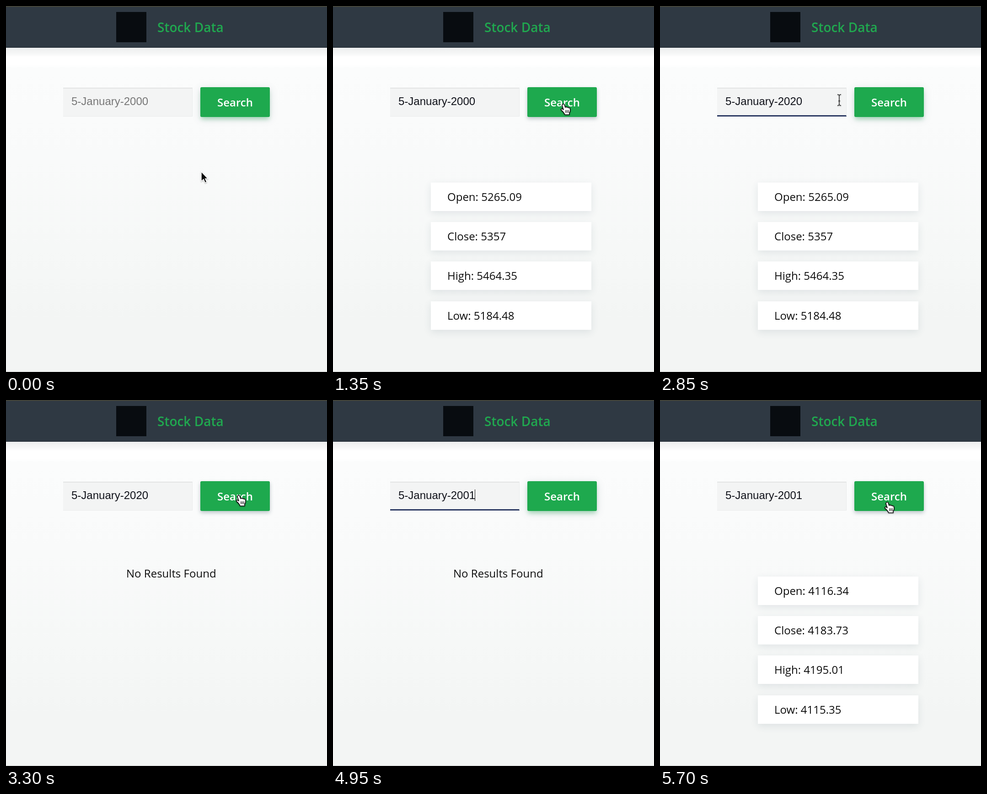
Write an HTML page that moves like this. It is 702 px wide and 798 px high and loops after 6000 ms.

```html
<!DOCTYPE html>
<html lang="en">
<head>
<meta charset="utf-8">
<title>Stock Data</title>
<style>
  html, body { margin: 0; width: 100%; height: 100%; overflow: hidden; }
  #stage {
    position: relative; width: 702px; height: 798px; overflow: hidden;
    background: linear-gradient(#fff 128px, #fbfcfc 136px, #f9fafa 330px, #f6f8f7 530px, #f3f5f4 690px, #f3f5f4);
    font: 24px "Open Sans", sans-serif; color: #0c0c0c;
  }
  #stage * { position: absolute; box-sizing: border-box; white-space: pre; }
  header {
    left: 0; top: 0; width: 702px; height: 91px; background: #2f3943;
    border-top: 2px solid #46473b; border-bottom: 1px solid #1e272f;
  }
  .shade { top: 91px; width: 702px; height: 20px; background: linear-gradient(#eceeee, #f4f5f5 50%, #f7f8f8 70%, #fff); }
  .logo { left: 241px; top: 13px; width: 66px; height: 66px; background: #080c10; }
  h1 { left: 331px; top: 26px; margin: 0; font-size: 28px; line-height: 40px; font-weight: 600; color: #20a84f; }
  #field {
    left: 125px; top: 178px; width: 283px; height: 63px; padding-left: 18px;
    background: #f3f4f4; border: 1px solid #e9ebeb; border-top: 2px solid #e2e4e4; border-left-width: 0;
    font: 24px/55px "Liberation Sans", Arial, sans-serif; color: #777;
  }
  #field.filled { color: #10121a; }
  #field.focus { border-bottom: 3px solid #2c3a63; }
  #caret { left: 310px; top: 195px; width: 1px; height: 25px; background: #111; }
  button {
    left: 425px; top: 177px; width: 152px; height: 65px; padding: 0; border: 0; border-radius: 3px;
    background: #1ea94e; color: #fff; font: 600 24px/65px "Open Sans", sans-serif;
    box-shadow: 0 7px 9px -2px #1ea94e4d, 0 4px 18px #50646e2e;
  }
  button.hover { box-shadow: 0 4px 9px #32505a4d; }
  .row {
    left: 214px; width: 351px; height: 62px; padding-left: 36px; line-height: 62px;
    background: #fff; box-shadow: 0 5px 16px #32465a1c;
  }
  #empty { left: 263px; top: 361px; line-height: 33px; }
  #stage svg { left: 0; top: 0; width: 30px; height: 32px; overflow: visible; filter: drop-shadow(0 1px 1px #0005); }
  .floor { left: 0; top: 797px; width: 702px; height: 1px; background: #c3c5c5; }
</style>
</head>
<body>
<div id="stage">
  <div class="shade"></div>
  <header></header>
  <div class="logo"></div>
  <h1>Stock Data</h1>
  <div id="field"></div>
  <div id="caret"></div>
  <button id="search">Search</button>
  <div id="rows"></div>
  <div id="empty">No Results Found</div>
  <div class="floor"></div>
  <svg id="arrow"><path d="M0 0V21L5 17L8.500 24.500L12 23L8.700 15.500H14.500Z" fill="#080808" stroke="#fff" stroke-width="1.500"/></svg>
  <svg id="beam"><path d="M0 0Q4 0 4 3V21Q4 24 0 24M8 0Q4 0 4 3V21Q4 24 8 24M2 14H6" fill="none" stroke="#333" stroke-width="1.500"/></svg>
  <svg id="hand">
    <path d="M4 2Q6-1 8 2L10 8Q12 6 14 8Q16 7 17 9Q20 8 20.500 11Q22 16 19 20V24H9Q7 19 1 14Q0 11 3 11L6 13L3 4Q3 2 4 2Z" fill="#fff" stroke="#111" stroke-width="1.700" stroke-linejoin="round"/>
    <path d="M11 14V20M14 14V20M17 14V20" fill="none" stroke="#111" stroke-width="1.300"/>
  </svg>
</div>
<script>
const LOOP = 6000;
const LABELS = ["Open", "Close", "High", "Low"];
const QUOTES = {
  first: ["5265.09", "5357", "5464.35", "5184.48"],
  second: ["4116.34", "4183.73", "4195.01", "4115.35"]
};
// Each step changes only the listed parts of the state.
const STEPS = [
  [0, { year: "2000", filled: false, focus: false, caret: false, result: "", pointer: "arrow", x: 427, y: 361 }],
  [150, { pointer: "beam", x: 341, y: 214 }],
  [300, { focus: true }],
  [450, { filled: true, pointer: "" }],
  [600, { pointer: "hand", x: 498, y: 213 }],
  [900, { focus: false }],
  [1200, { result: "first" }],
  [1800, { pointer: "beam", x: 324, y: 195 }],
  [1950, { focus: true, caret: true }],
  [2100, { year: "200", caret: false, pointer: "" }],
  [2250, { year: "20" }],
  [2550, { year: "202" }],
  [2700, { year: "2020" }],
  [2850, { pointer: "beam", x: 388, y: 193 }],
  [3000, { pointer: "hand", x: 503, y: 207 }],
  [3150, { focus: false, result: "none" }],
  [3600, { pointer: "beam", x: 380, y: 188 }],
  [3750, { x: 333, y: 195, focus: true }],
  [4050, { year: "202", pointer: "" }],
  [4200, { year: "20" }],
  [4500, { year: "200" }],
  [4650, { year: "2001", caret: true }],
  [5100, { caret: false, pointer: "beam", x: 380, y: 195 }],
  [5250, { pointer: "hand", x: 491, y: 222 }],
  [5400, { focus: false }],
  [5550, { result: "second" }]
];

const $ = id => document.getElementById(id);
const show = (id, on) => { $(id).style.visibility = on ? "visible" : "hidden"; };

const rows = LABELS.map((label, i) => {
  const row = document.createElement("div");
  row.className = "row";
  row.style.top = 385 + i * 86.2 + "px";
  $("rows").append(row);
  return row;
});

function stateAt(time) {
  return Object.assign({}, ...STEPS.filter(([start]) => start <= time).map(([, change]) => change));
}

function draw(time) {
  const s = stateAt(time);
  $("field").textContent = "5-January-" + s.year;
  $("field").classList.toggle("filled", s.filled);
  $("field").classList.toggle("focus", s.focus);
  $("search").classList.toggle("hover", s.pointer === "hand");
  show("caret", s.caret);
  show("empty", s.result === "none");
  const quotes = QUOTES[s.result];
  show("rows", quotes);
  if (quotes) rows.forEach((row, i) => { row.textContent = `${LABELS[i]}: ${quotes[i]}`; });
  for (const id of ["arrow", "beam", "hand"]) show(id, s.pointer === id);
  if (s.pointer) $(s.pointer).style.transform = `translate(${s.x}px, ${s.y}px)`;
}

const begin = performance.now();
function tick() {
  draw((performance.now() - begin) % LOOP);
  requestAnimationFrame(tick);
}
draw(0);
requestAnimationFrame(tick);
</script>
</body>
</html>
```
